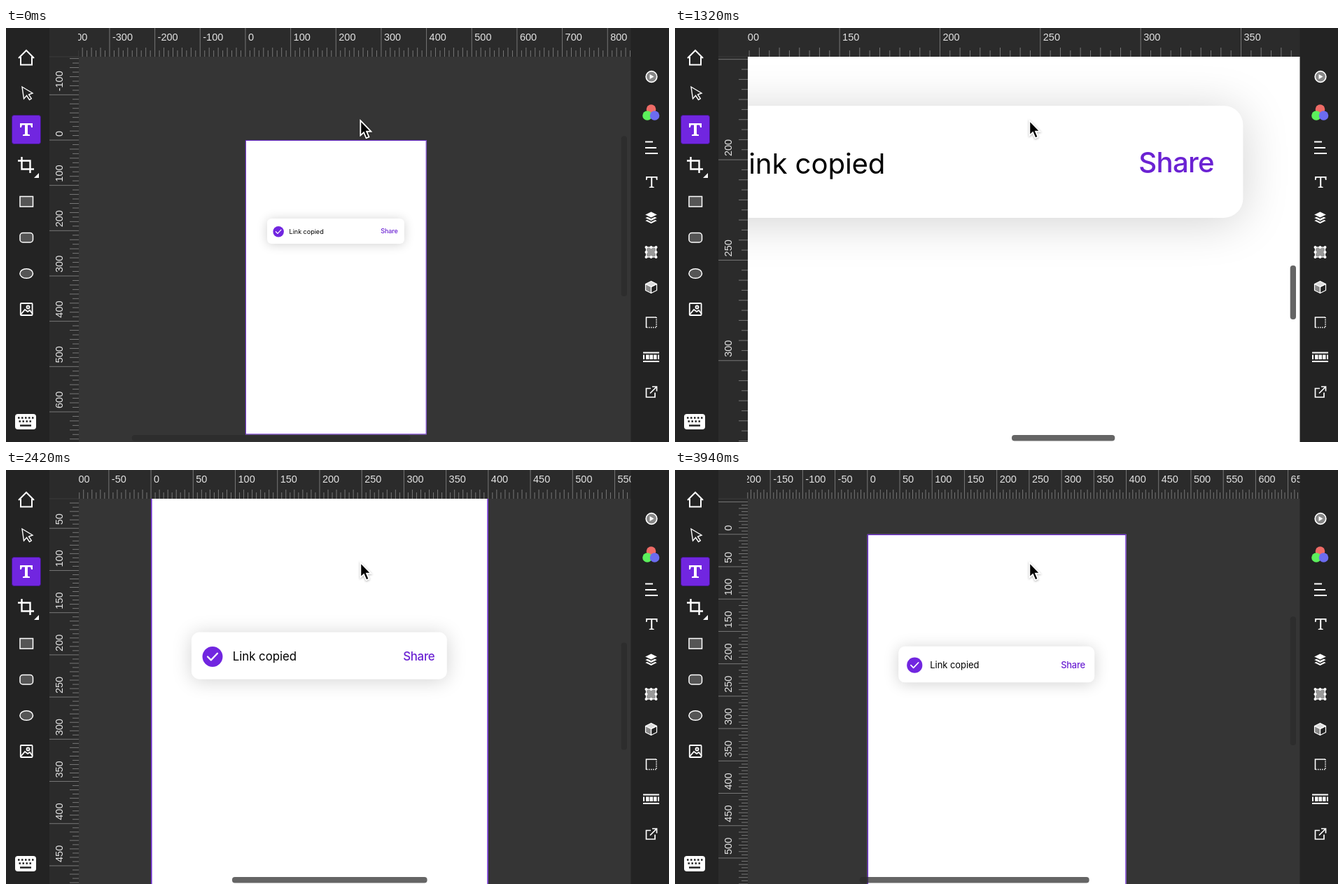
Write an HTML page with a canvas that moves like this. It is 947 px wide and 591 px high and loops after 3970 ms.

```html
<!DOCTYPE html>
<html lang="en">
<head>
<meta charset="utf-8">
<title>Canvas zoom</title>
<style>
  html, body { margin: 0; width: 100%; height: 100%; overflow: hidden; background: #353535; }
  canvas, svg { position: absolute; left: 0; top: 0; }
</style>
</head>
<body>
<canvas id="stage" width="947" height="591"></canvas>
<svg width="947" height="591" fill="none" stroke="#fff" stroke-width="2">
  <g stroke="none">
    <path fill="#232323" d="M0 0h62v591H0zM892.500 0H947v591h-54.500z"/>
    <rect x="8.500" y="124.500" width="41" height="41" rx="3" fill="#7126e0" stroke="#3f1880" stroke-width="1"/>
  </g>

  <!-- left tools -->
  <path d="M18 43 29 32l11 11M21 41v11.500h16V41"/>
  <path stroke-width="1.400" d="M23 84l2.500 17 4-4.500 4 6 2.800-1.800-3.800-5.700 5.500-2z"/>
  <path stroke="none" fill="#fff" d="M20 136h18v6h-1.800l-1.200-3.500h-4v13l3 .8v1.700H24v-1.700l3-.8v-13h-4L21.800 142H20z"/>
  <path stroke-width="2.400" d="M22.500 184v17.500H40M17 189.500h17.500V207"/>
  <path stroke="none" fill="#fff" d="M47 207v7h-7z"/>
  <g fill="#555" stroke-width="1.500">
    <rect x="20" y="240.500" width="18.500" height="14.500"/>
    <rect x="20" y="292.500" width="18.500" height="13.500" rx="4"/>
    <ellipse cx="29.200" cy="350.500" rx="9.300" ry="6.800"/>
  </g>
  <g stroke-width="1.800">
    <rect x="20.800" y="393" width="16.800" height="17" rx="1"/>
    <circle cx="31.500" cy="398.500" r="2"/>
    <path d="M21 409l6-7 4 3 3-2 4 5"/>
  </g>
  <rect x="13" y="551" width="30" height="22" rx="4" fill="#fff" stroke="none"/>
  <g stroke="#232323" stroke-width="2.500">
    <path stroke-dasharray="2.500 2.500" d="M17 556.500h23M18.500 561.500h20"/>
    <path d="M20 567.500h16"/>
  </g>

  <!-- right panel -->
  <circle cx="922" cy="69.500" r="7.800" fill="#888" stroke-width="1.700"/>
  <path stroke="none" fill="#fff" d="M919.500 66v7l6-3.500z"/>
  <g stroke="none">
    <circle cx="921.500" cy="116" r="6.800" fill="#ee6b66"/>
    <circle cx="916" cy="125" r="6.800" fill="#5cf05c"/>
    <circle cx="926.500" cy="125" r="6.800" fill="#6c6cf0"/>
  </g>
  <path stroke-width="2.200" d="M913 162.500h11M913 171h16M913 179h18"/>
  <path stroke="none" fill="#fff" d="M914 212h16.500v5H929l-.8-3.200h-5v12.500l2.500.6v1.100h-7v-1.100l2.500-.6v-12.500h-5l-.8 3.200H914z"/>
  <g fill="#fff" stroke="#232323" stroke-width="1.400">
    <path d="M911.500 275l10-4.500 10 4.500-10 5z"/>
    <path d="M911.500 271l10-4.500 10 4.500-10 5z"/>
    <path d="M911.500 266.500l10-5 10 5-10 5z"/>
  </g>
  <rect x="914.500" y="313" width="14" height="14" fill="#999" stroke-width="1.200"/>
  <path stroke-width="4" stroke-linecap="round" d="M914.500 313h0M921.500 313h0M928.500 313h0M914.500 320h0M928.500 320h0M914.500 327h0M921.500 327h0M928.500 327h0"/>
  <g stroke-width="1.200" stroke-linejoin="round">
    <path fill="#ddd" d="M913.500 365.500l8-4 8 4-8 4z"/>
    <path fill="#888" d="M913.500 365.500l8 4v9l-8-4z"/>
    <path d="M921.500 369.500l8-4v9l-8 4z"/>
  </g>
  <g stroke-width="1.600">
    <path d="M914.500 428v-15H929"/>
    <path stroke-dasharray="1.500 1.500" d="M929 413v14.500h-14.500"/>
  </g>
  <path stroke-width="1.800" d="M910 463.500h23M910 476h23"/>
  <path stroke-width="6.500" d="M910 469.700h2M914 469.700h4.500M919.500 469.700h4.500M925 469.700h4.500M931 469.700h2"/>
  <path stroke-width="1.700" d="M921 514.500h-6.500V527H927v-6.500M923 512h6.500v6.500M929 512.500l-9 9"/>
</svg>
<canvas id="pointer" width="947" height="591"></canvas>
<script>
const c = document.getElementById('stage').getContext('2d');
const LOOP = 3970;
const CENTER = { x: 498.3, y: 318.8 };   // stays put while zooming
const ANCHOR = { x: 241.8, y: 245.6 };   // document point under CENTER

// time in ms, natural log of the zoom factor
const KEYS = [
  [0, -.436], [870, .812], [1190, 1.08], [1320, 1.0536], [1870, .631],
  [2420, .1865], [3040, -.081], [3250, -.0787], [LOOP, -.0787]
];

const slope = i => (KEYS[i + 1][1] - KEYS[i][1]) / (KEYS[i + 1][0] - KEYS[i][0]);

// harmonic mean keeps the curve free of overshoot
function tangent(i) {
  if (i === 0 || i === KEYS.length - 1) return 0;
  const a = slope(i - 1), b = slope(i);
  return a * b > 0 ? 2 * a * b / (a + b) : 0;
}

function zoomAt(t) {
  let i = 0;
  while (i < KEYS.length - 2 && t >= KEYS[i + 1][0]) i++;
  const [t0, p0] = KEYS[i], [t1, p1] = KEYS[i + 1];
  const d = t1 - t0, u = (t - t0) / d, v = 1 - u;
  return Math.exp(
    p0 * v * v * (1 + 2 * u) + p1 * u * u * (3 - 2 * u) +
    d * u * v * (v * tangent(i) - u * tangent(i + 1)));
}

function clipped(x, y, w, h, paint) {
  c.save();
  c.beginPath();
  c.rect(x, y, w, h);
  c.clip();
  paint();
  c.restore();
}

function round(x, y, w, h, r) {
  c.beginPath();
  c.roundRect(x, y, w, h, r);
  c.fill();
}

function page(s, x0, y0) {
  c.save();
  c.translate(x0, y0);
  c.scale(s, s);
  c.fillStyle = '#fff';
  c.fillRect(0, 0, 400, 650);
  const line = 1 + .3 / s;
  c.strokeStyle = '#6420cc';
  c.lineWidth = line;
  c.strokeRect(line / 2, line / 2, 400 - line, 650 - line);

  c.fillStyle = '#fff';
  c.shadowColor = 'rgba(0,0,0,.18)';
  c.shadowBlur = 23 * s;
  c.shadowOffsetY = 2 * s;
  round(48, 173.1, 303, 55.8, 9.6);
  c.shadowColor = 'transparent';

  c.fillStyle = '#7126e0';
  c.beginPath();
  c.arc(73, 202.2, 12, 0, 7);
  c.fill();
  c.strokeStyle = '#fff';
  c.lineWidth = 1.9;
  c.lineCap = c.lineJoin = 'round';
  c.beginPath();
  c.moveTo(67.2, 202.2);
  c.lineTo(71.2, 206.2);
  c.lineTo(78.8, 198.2);
  c.stroke();

  c.fillStyle = '#000';
  c.font = '14px Inter, sans-serif';
  c.letterSpacing = '-.03px';
  c.fillText('Link copied', 96.8, 207.1);
  c.fillStyle = '#6b22d3';
  c.font = '500 14px Inter, sans-serif';
  c.letterSpacing = '-.25px';
  c.fillText('Share', 299, 206.4);
  c.restore();
}

function scrollbars(s) {
  const h = 1 / (s + .66), v = 1 / (s + .4784);
  c.fillStyle = 'rgba(42,42,42,.72)';
  round(658.2 - 625 * h, 581, 519.5 * h, 8.5, 4);
  round(878.7, 432.7 - 313.4 * v, 8.3, 257.6 * v, 4);
}

function ruler(s, origin, from, to, vertical) {
  const step = s < .8 ? 100 : 50, gap = step / 10;
  const edge = vertical ? 104 : 41;
  c.font = '14.5px "Liberation Sans", Arial, sans-serif';
  c.lineWidth = 1;
  c.strokeStyle = '#777';
  c.fillStyle = '#e2e2e2';
  const first = Math.floor((from - origin) / s / gap) - 10;
  for (let i = first; origin + i * gap * s < to; i++) {
    const p = origin + i * gap * s;
    const major = i % 10 === 0;
    const start = edge - (major ? 42 : i % 2 ? 9 : 13);
    c.beginPath();
    if (vertical) { c.moveTo(start, p); c.lineTo(edge, p); }
    else { c.moveTo(p, start); c.lineTo(p, edge); }
    c.stroke();
    if (!major) continue;
    c.save();
    if (vertical) { c.translate(81, p - 5); c.rotate(-Math.PI / 2); }
    else c.translate(p + 4, 17.5);
    c.fillText(i * gap, 0, 0);
    c.restore();
  }
}

function draw(t) {
  const s = zoomAt(t);
  const x0 = CENTER.x - s * ANCHOR.x, y0 = CENTER.y - s * ANCHOR.y;
  c.fillStyle = '#353535';
  c.fillRect(0, 0, 947, 591);
  clipped(104, 41, 789, 550, () => { page(s, x0, y0); scrollbars(s); });
  c.fillStyle = '#2b2b2b';
  c.fillRect(62, 0, 831, 41);
  c.fillRect(62, 0, 42, 591);
  clipped(103, 0, 790, 41, () => ruler(s, x0, 103, 893, false));
  clipped(62, 42, 42, 549, () => ruler(s, y0, 42, 591, true));
  c.fillStyle = '#3c3c3c';
  c.fillRect(62, 40.5, 42, 1);
}

function drawPointer() {
  const g = document.getElementById('pointer').getContext('2d');
  const arrow = new Path2D('M506.500 132.500v20.500l4.600-4.300 3.500 8.300 3.700-1.600-3.500-8h6.200z');
  g.shadowColor = 'rgba(0,0,0,.35)';
  g.shadowBlur = 3;
  g.shadowOffsetY = 1;
  g.strokeStyle = '#fff';
  g.lineWidth = 2;
  g.stroke(arrow);
  g.shadowColor = 'transparent';
  g.fillStyle = '#000';
  g.fill(arrow);
  g.lineWidth = 1.5;
  g.stroke(arrow);
}

const begin = performance.now();
function frame() {
  draw((performance.now() - begin) % LOOP);
  requestAnimationFrame(frame);
}
drawPointer();
frame();
</script>
</body>
</html>
```
